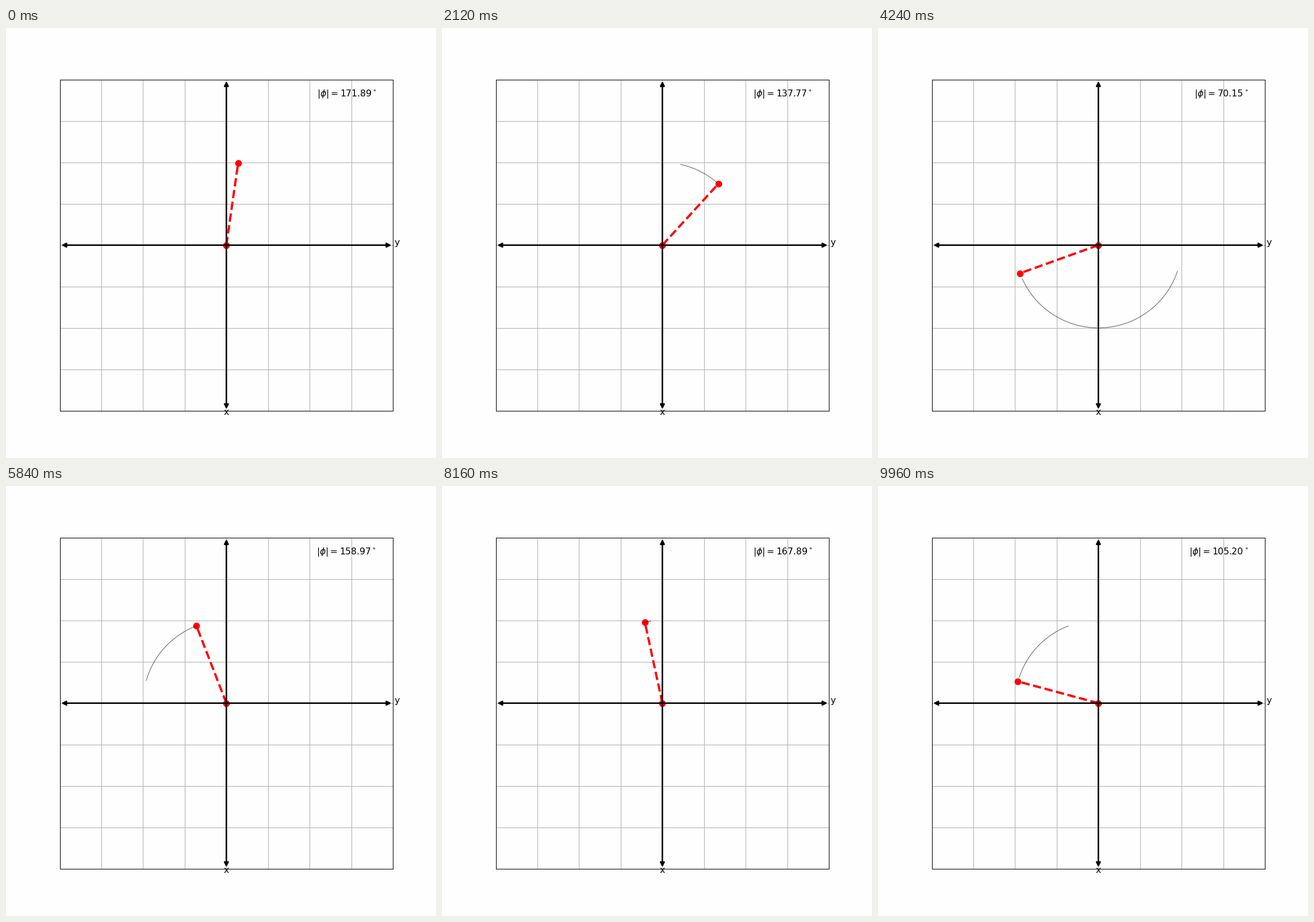
Animation, 748 px wide and 748 px high, one loop 10000 ms. Source, as a matplotlib script:

```python
import numpy as np
import matplotlib.pyplot as plt
from matplotlib.animation import FuncAnimation

FRAMES = 250
STEP = 0.04          # seconds per frame
TRAIL = 30           # frames kept in the trail
G, LENGTH = 9.81, 8.0
START = 3.0          # release angle in radians, at rest
RADIUS = 2.0         # drawn length of the rod
LIMIT = 4


def swing(frames, substeps=20):
    """Angles of a free pendulum, one per frame (RK4)."""
    def rate(s):
        return np.array([s[1], -G / LENGTH * np.sin(s[0])])

    h = STEP / substeps
    state = np.array([START, 0.0])
    angles = []
    for _ in range(frames):
        angles.append(state[0])
        for _ in range(substeps):
            k1 = rate(state)
            k2 = rate(state + h / 2 * k1)
            k3 = rate(state + h / 2 * k2)
            k4 = rate(state + h * k3)
            state = state + h / 6 * (k1 + 2 * k2 + 2 * k3 + k4)
    return np.array(angles)


phi = swing(FRAMES)
xs, ys = RADIUS * np.sin(phi), -RADIUS * np.cos(phi)

plt.rcParams.update({"font.family": "DejaVu Sans", "font.size": 12})
fig = plt.figure(figsize=(8, 8), dpi=93.5, facecolor="#fefefe")
ax = fig.add_axes([0.125, 0.11, 0.775, 0.77], facecolor="#fefefe")
ax.set(xlim=(-LIMIT, LIMIT), ylim=(-LIMIT, LIMIT))
ticks = range(-LIMIT, LIMIT + 1)
ax.set_xticks(ticks)
ax.set_yticks(ticks)
ax.tick_params(length=0, labelbottom=False, labelleft=False)
ax.grid(color="#b0b0b0", lw=0.8)
ax.set_axisbelow(True)


def axis_arrow(tail, head):
    ax.annotate("", xy=head, xytext=tail, arrowprops=dict(
        arrowstyle="<|-|>", lw=2, color="black", mutation_scale=12,
        shrinkA=2, shrinkB=2))


axis_arrow((-LIMIT, 0), (LIMIT, 0))
axis_arrow((0, -LIMIT), (0, LIMIT))
ax.text(LIMIT + 0.1, 0, "y", ha="center")
ax.text(0, -LIMIT - 0.1, "x", ha="center")

rod, = ax.plot([], [], "o--", color="red", lw=3, ms=8)
trail, = ax.plot([], [], "-", color="black", lw=1, alpha=0.5)
label = ax.text(0.95, 0.95, "", ha="right", transform=ax.transAxes)


def update(i):
    past = slice(max(0, i - TRAIL), i)
    rod.set_data([0, xs[i]], [0, ys[i]])
    trail.set_data(xs[past], ys[past])
    label.set_text(rf"$|\phi| = {abs(np.degrees(phi[i])):.2f}^\circ$")
    return rod, trail, label


anim = FuncAnimation(fig, update, frames=FRAMES, interval=1000 * STEP,
                     repeat=True, repeat_delay=0)
plt.show()
```
